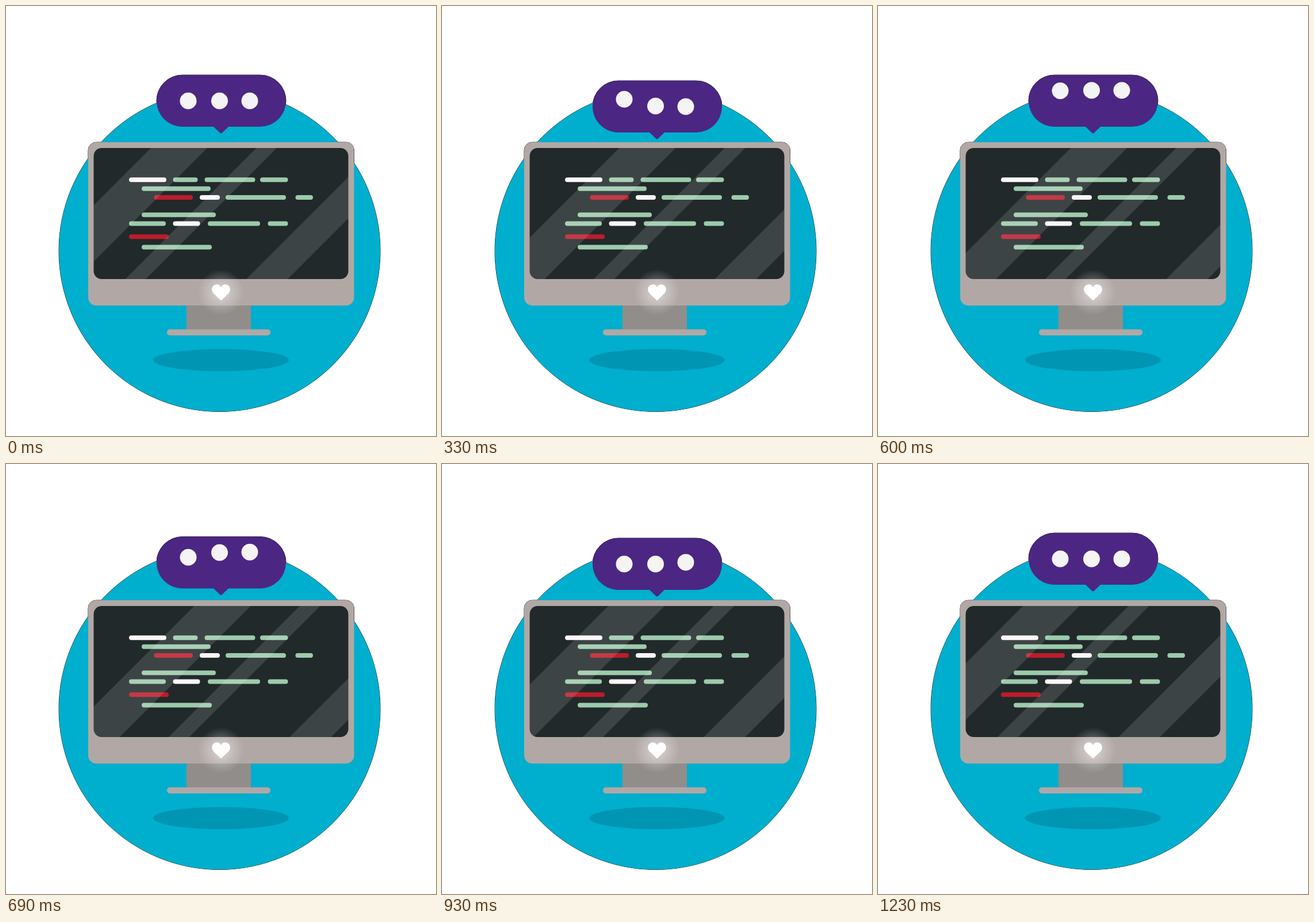
These frames come from a looping animation (748 by 748 pixels, 1.26 s). An HTML page:

```html
<!DOCTYPE html>
<html lang="en">
<head>
<meta charset="utf-8">
<title>Coding monitor</title>
<style>
  html, body { margin: 0; width: 100%; height: 100%; overflow: hidden; background: #fff; }
  svg { display: block; width: 100vw; height: 100vh; }
  .glare { fill: #fff; fill-opacity: .125; }
</style>
</head>
<body>
<svg viewBox="0 0 748 748">
  <defs>
    <path id="bubble" d="M307 120H442A45 45 0 0 1 442 210H387L376 220.5Q374 222.5 372 220.5L361 210H307A45 45 0 0 1 307 120Z"/>
    <rect id="case" x="143" y="237" width="462.5" height="284" rx="14"/>
    <clipPath id="screen"><rect x="152.5" y="247" width="443" height="228" rx="14"/></clipPath>
    <radialGradient id="glow">
      <stop offset="0" stop-color="#fff" stop-opacity=".55"/>
      <stop offset=".45" stop-color="#fff" stop-opacity=".27"/>
      <stop offset="1" stop-color="#fff" stop-opacity="0"/>
    </radialGradient>
  </defs>

  <!-- dark rim, visible only against the white page -->
  <g stroke="#000" stroke-width=".9">
    <circle cx="371.5" cy="426" r="279.5"/>
    <use href="#case"/>
    <use href="#bubble" class="bob"/>
  </g>

  <circle cx="371.5" cy="426" r="279.5" fill="#00aece"/>
  <ellipse cx="374" cy="616" rx="118" ry="19.3" fill="#0096b3"/>
  <rect x="314" y="520" width="112" height="44" fill="#918d8a"/>
  <rect x="280" y="562.5" width="180" height="10.5" rx="5" fill="#b1a8a5"/>
  <use href="#case" fill="#b1a8a5"/>

  <g clip-path="url(#screen)">
    <rect x="152" y="247" width="444" height="228" fill="#21292a"/>
    <g id="code" stroke-width="8" stroke-linecap="round"></g>
    <g id="glare"></g>
  </g>

  <circle cx="374" cy="498" r="40" fill="url(#glow)"/>
  <path fill="#fff" d="M374 512.5L361 500C356.5 495 357.5 487 363.5 485C367.5 483.3 372 485 374 489C376 485 380.500 483.300 384.500 485C390.500 487 391.500 495 387 500Z"/>

  <g class="bob">
    <use href="#bubble" fill="#4c2683"/>
    <g id="dots" fill="#f5f4f5"></g>
  </g>
</svg>

<script>
const LOOP = 1260, STEP = 30;
const $ = id => document.getElementById(id);

function add(parent, tag, attrs) {
  const el = document.createElementNS("http://www.w3.org/2000/svg", tag);
  for (const key in attrs) el.setAttribute(key, attrs[key]);
  return parent.appendChild(el);
}

// Code rows: y, then [colour, left, right] for each dash
const INK = { w: "#faf7f8", g: "#9dcaab", r: "#bc1c2c" };
const ROWS = [
  [302.3, ["w", 214, 279], ["g", 290.5, 333.5], ["g", 345.5, 433.5], ["g", 442, 490.5]],
  [317.8, ["g", 236, 356]],
  [333, ["r", 257.5, 325], ["w", 337, 372], ["g", 382, 487], ["g", 503.5, 534]],
  [363.3, ["g", 236, 365]],
  [378.5, ["g", 214, 278], ["w", 290.5, 337.5], ["g", 351, 442], ["g", 455.5, 490.5]],
  [401.2, ["r", 214, 283]],
  [419.4, ["g", 236, 358]]
];
for (const [y, ...dashes] of ROWS)
  for (const [ink, a, b] of dashes)
    add($("code"), "path", { d: `M${a + 4} ${y}H${b - 4}`, stroke: INK[ink] });

// Diagonal bands: left edge at the top of the screen, width
for (const [x, w] of [[252, 98], [435.5, 35.5], [646, 72]])
  add($("glare"), "path", { class: "glare", d: `M${x} 247h${w}l-228 228h${-w}Z` });

const dots = [317, 371.5, 424].map(cx => add($("dots"), "circle", { cx, cy: 165, r: 14.5 }));
const bobs = document.querySelectorAll(".bob");

const ease = u => (u = Math.min(1, Math.max(0, u)), u * u * (3 - 2 * u));
const ramp = (t, start, length) => ease((t - start) / length);
const shift = (el, x, y) => el.setAttribute("transform", `translate(${x} ${y})`);

function draw(t) {
  shift($("glare"), 85 * (ramp(t, 0, 540) - ramp(t, 540, 720)), 0);

  const dip = ramp(t, 0, 150) - ramp(t, 330, 150) + ramp(t, 600, 150) - ramp(t, 900, 150);
  bobs.forEach(el => shift(el, 0, 10 * dip));

  dots.forEach((dot, i) => {
    const lag = i * 90;
    shift(dot, 0, -18.3 * (ramp(t, 215 + lag, 180) - ramp(t, 570 + lag, 240)));
  });
}

const begin = performance.now();
function tick() {
  const t = (performance.now() - begin) % LOOP;
  draw(Math.floor(t / STEP) * STEP);
  requestAnimationFrame(tick);
}
tick();
</script>
</body>
</html>
```
